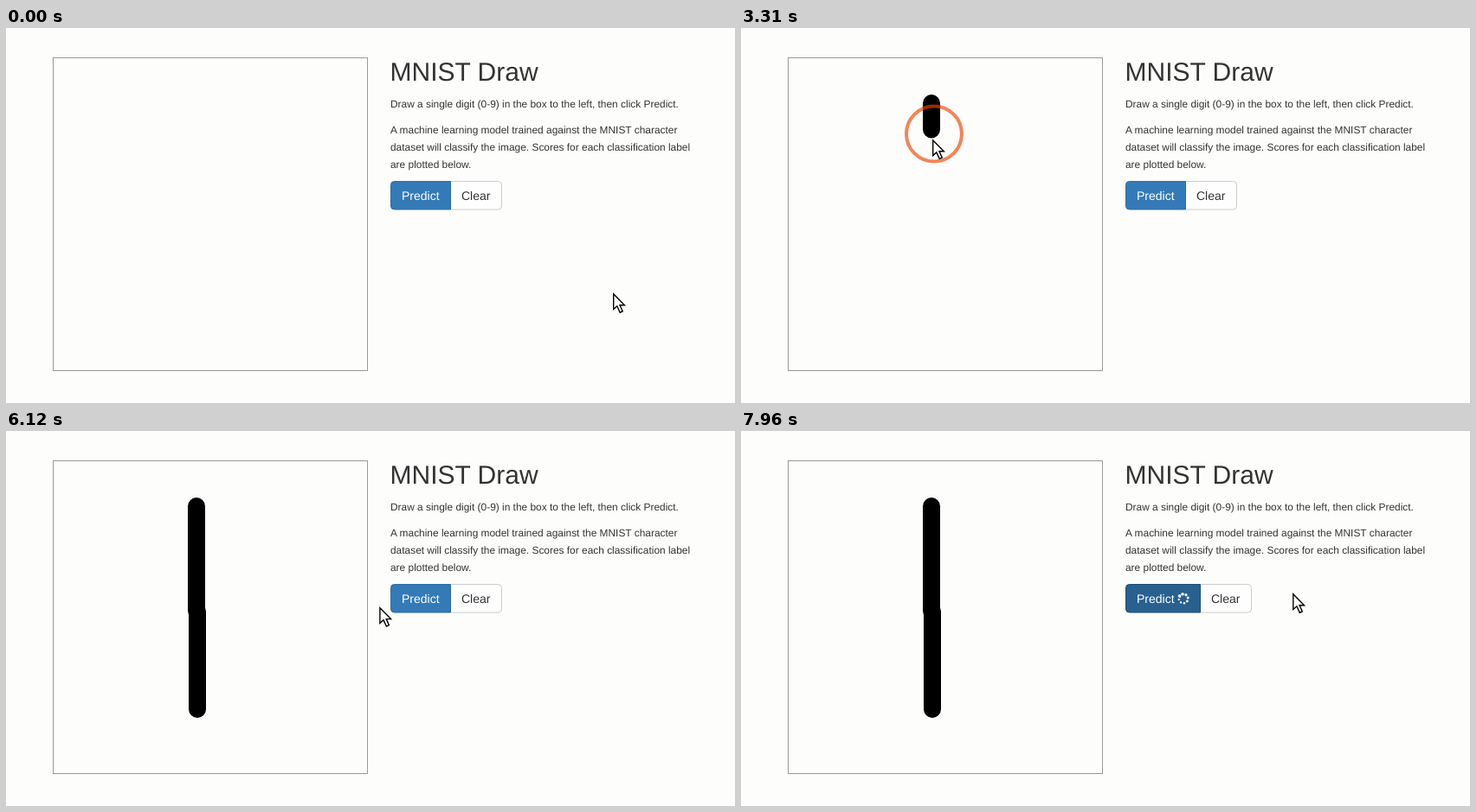
An HTML page that plays this animation: 842x434 px, repeating every 8 s.

```html
<!DOCTYPE html>
<html lang="en">
<head>
<meta charset="utf-8">
<title>MNIST Draw</title>
<style>
  html, body { margin: 0; width: 100%; height: 100%; overflow: hidden; background: #fdfdfb; }
  svg { display: block; width: 842px; height: 434px; }
  text { font-family: "Liberation Sans", Arial, sans-serif; fill: #333; text-rendering: geometricPrecision; white-space: pre; }
  .title { font-size: 30px; }
  .body { font-size: 11.92px; }
  .button { font-size: 14px; }
</style>
</head>
<body>
<svg viewBox="0 0 842 434">
  <rect width="842" height="434" fill="#fdfdfb"/>
  <rect x="54.5" y="34.5" width="363" height="362" fill="none" stroke="#999"/>
  <path id="ink" fill="none" stroke="#000" stroke-width="20" stroke-linecap="round" stroke-linejoin="round"/>

  <text class="title" x="443.5" y="61">MNIST Draw</text>
  <g class="body">
    <text x="444" y="92">Draw a single digit (0-9) in the box to the left, then click Predict.</text>
    <text x="444" y="122">A machine learning model trained against the MNIST character</text>
    <text x="444" y="142">dataset will classify the image. Scores for each classification label</text>
    <text x="444" y="162">are plotted below.</text>
  </g>

  <g id="clear">
    <path id="clearBox" d="M0 177.5H55a4 4 0 0 1 4 4V206a4 4 0 0 1 -4 4H0Z"/>
    <text class="button" x="12.5" y="199">Clear</text>
  </g>
  <path id="predict"/>
  <text class="button" x="457" y="199" style="fill:#fff">Predict</text>
  <g id="spinner" fill="#fff"></g>

  <circle id="ring" r="32" fill="none" stroke="#ee4400" stroke-opacity=".65" stroke-width="4"/>
  <path id="cursor" d="M.7 .8V18.5L4.8 14.8L8.2 22.2L11.2 20.8L8 13.7H13.4Z" fill="#fff" stroke="#000" stroke-width="1.4"/>
</svg>
<script>
const LOOP = 8000;
const PEN_DOWN = 2850, PEN_UP = 4980;
const CLICK = 6620, CLICK_END = 6770;

// time, x, y of the pointer tip; repeated places are rests
const keys = [
  [0, 701, 307], [850, 701, 307], [1950, 221, 88], [2950, 221, 88],
  [3310, 221, 129], [4330, 222, 256], [4870, 222, 323], [5150, 222, 323],
  [6120, 431, 204], [6520, 484, 196], [6800, 484, 196],
  [7390, 568, 179], [7960, 637, 188], [8100, 648, 190]
];

const $ = id => document.getElementById(id);
const set = (id, attrs) => {
  for (const name in attrs) $(id).setAttribute(name, attrs[name]);
};
const show = (id, on) => set(id, { visibility: on ? "visible" : "hidden" });

function slope(i, axis) {
  const a = keys[i - 1], b = keys[i], c = keys[i + 1];
  const rests = (p, q) => p[1] === q[1] && p[2] === q[2];
  if (!a || !c || rests(a, b) || rests(b, c)) return 0;
  return (c[axis] - a[axis]) / (c[0] - a[0]);
}

function pointer(t) {
  let i = 0;
  while (i < keys.length - 2 && t >= keys[i + 1][0]) i++;
  const a = keys[i], b = keys[i + 1], span = b[0] - a[0];
  const u = Math.max(0, (t - a[0]) / span), v = 1 - u;
  return [1, 2].map(k =>
    a[k] * (1 + 2 * u) * v * v + b[k] * u * u * (3 - 2 * u) +
    span * u * v * (slope(i, k) * v - slope(i + 1, k) * u));
}

for (let i = 0; i < 8; i++) {
  const dot = document.createElementNS("http://www.w3.org/2000/svg", "circle");
  const angle = i * Math.PI / 4;
  dot.setAttribute("cx", 5.3 * Math.cos(angle));
  dot.setAttribute("cy", 5.3 * Math.sin(angle));
  dot.setAttribute("r", 1.8 - i * 0.1);
  $("spinner").append(dot);
}

function draw(t) {
  const [x, y] = pointer(t);
  set("cursor", { transform: `translate(${x} ${y})` });

  // the ink and the ring trail behind the pointer; the ink stays after release
  const end = pointer(Math.min(t - 78, PEN_UP))[1] - 1;
  set("ink", { d: "M220 87" + (end < 209 ? `V${end + .01}` : `V208L221 209V${end + .01}`) });
  show("ink", t >= PEN_DOWN);

  const [rx, ry] = pointer(t - 50);
  set("ring", { cx: rx + 2, cy: ry });
  show("ring", (t >= PEN_DOWN && t < PEN_UP) || (t >= CLICK && t < CLICK_END));

  const busy = t >= CLICK_END;
  const edge = busy ? 530.5 : 513.5;
  const inRow = y >= 177 && y <= 211;
  const onPredict = inRow && x >= 444 && x < edge;
  const onClear = inRow && x >= edge && x < edge + 59;
  const dark = busy || onPredict;

  set("predict", {
    d: `M448.5 177.5H${edge}V210H448.5a4 4 0 0 1 -4 -4V181.5a4 4 0 0 1 4 -4Z`,
    fill: dark ? "#286090" : "#337ab7",
    stroke: dark ? "#204d74" : "#2e6da4"
  });
  set("clear", { transform: `translate(${edge} 0)` });
  set("clearBox", {
    fill: onClear ? "#e6e6e6" : "#fefefe",
    stroke: onClear ? "#adadad" : "#ccc"
  });

  show("spinner", busy);
  set("spinner", { transform: `translate(511 194) rotate(${(t - CLICK_END) * .18})` });
}

const start = performance.now();
function tick() {
  draw((performance.now() - start) % LOOP);
  requestAnimationFrame(tick);
}
tick();
</script>
</body>
</html>
```
